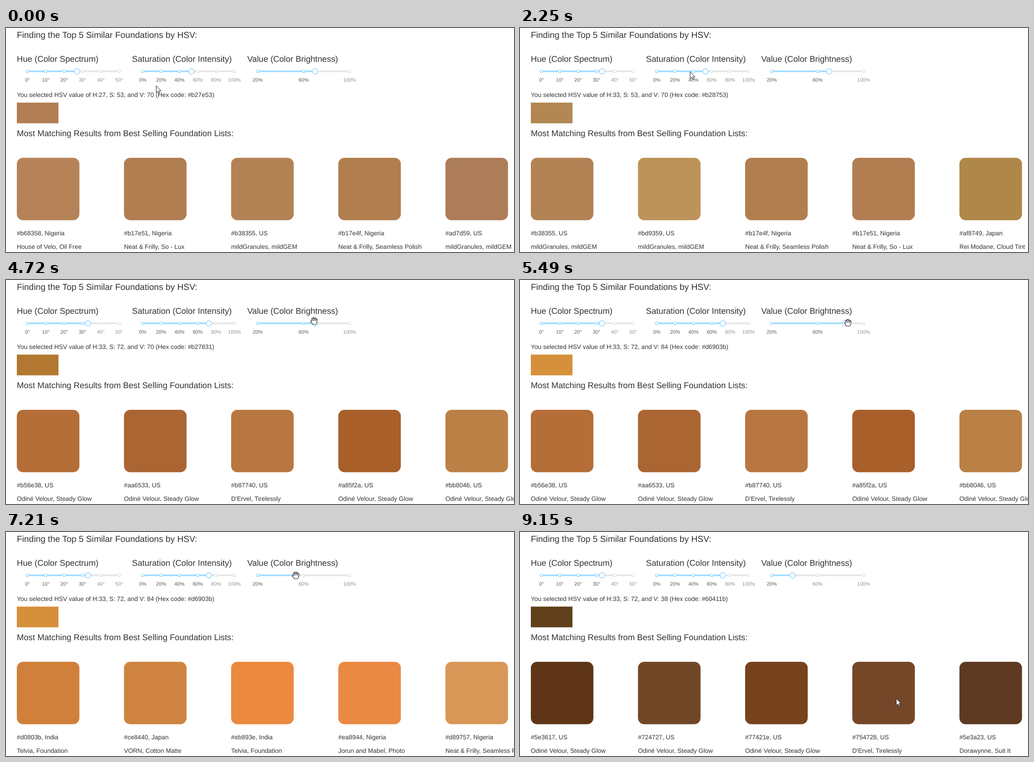
An HTML page with a canvas for the animation above (9.22 s loop, 1126x497 px).

```html
<!DOCTYPE html>
<html lang="en">
<head>
<meta charset="utf-8">
<title>Foundation finder</title>
<style>
  html, body { margin: 0; width: 100%; height: 100%; overflow: hidden; background: #fff; }
  svg, canvas { position: absolute; left: 0; top: 0; width: 1126px; height: 497px; display: block; }
  text { font-family: "Liberation Sans", Arial, sans-serif; fill: #333; text-rendering: geometricPrecision; white-space: pre; }
  .title { font-size: 19.35px; }
  .head { font-size: 18.6px; }
  .body { font-size: 13.9px; }
  .mark { font-size: 11.2px; text-anchor: middle; }
</style>
</head>
<body>
<svg id="words" viewBox="0 0 1126 497"></svg>
<canvas id="stage" width="1126" height="497"></canvas>
<script>
const LOOP = 9220;
const svg = document.getElementById('words');
const ctx = document.getElementById('stage').getContext('2d');

// Moves: start, end, number of steps, then the values reached
const cursorMoves = [
  [80, 80, 1, 333, 125],
  [310, 1000, 10, 158, 94],
  [1170, 1550, 6, 184, 94],
  [1870, 2250, 6, 377, 97],
  [2400, 2560, 3, 409, 93],
  [2790, 3250, 7, 451, 94],
  [3800, 3950, 3, 622, 95],
  [4030, 4030, 1, 660, 97],
  [4180, 4720, 8, 683, 91],
  [4800, 5030, 4, 705, 93],
  [5110, 5490, 6, 727, 95],
  [6680, 7370, 10, 606, 97],
  [7600, 7980, 6, 598, 95]
  , [8920, 9150, 4, 834, 369.5]
];

const sliders = [
  { x: 47.5, min: 0, max: 50, marks: [0, 10, 20, 30, 40, 50], unit: '°',
    from: 27, moves: [[1170, 1550, 6, 33]] },
  { x: 303, min: 0, max: 100, marks: [0, 20, 40, 60, 80, 100], unit: '%',
    from: 53, moves: [[2790, 3250, 7, 72]] },
  { x: 558, min: 20, max: 100, marks: [20, 60, 100], unit: '%',
    from: 70, moves: [[4800, 5030, 4, 77.5], [5110, 5490, 6, 84], [6680, 7370, 10, 41], [7600, 7980, 6, 38]] }
];

// Chosen colour: time of the text, time of the swatch
const picks = [
  { text: 0, fill: 0, hsv: [27, 53, 70], hex: '#b27e53' },
  { text: 1710, fill: 1870, hsv: [33, 53, 70], hex: '#b28753' },
  { text: 3400, fill: 3400, hsv: [33, 72, 70], hex: '#b27831' },
  { text: 5490, fill: 5490, hsv: [33, 72, 84], hex: '#d6903b' },
  { text: 7830, fill: 7830, hsv: [33, 72, 38], hex: '#60411b' }
];

const mild = 'mildGranules, mildGEM';
const neat = 'Neat & Frilly, ';
const odine = 'Odiné Velour, Steady Glow';
const ervel = "D'Ervel, Tirelessly";

const results = [
  { text: 0, fill: 0, cards: [
    ['#b68358', 'Nigeria', 'House of Velo, Oil Free'],
    ['#b17e51', 'Nigeria', neat + 'So - Lux'],
    ['#b38355', 'US', mild],
    ['#b17e4f', 'Nigeria', neat + 'Seamless Polish'],
    ['#ad7d59', 'US', mild]] },
  { text: 2180, fill: 2250, cards: [
    ['#b38355', 'US', mild],
    ['#bd9359', 'US', mild],
    ['#b17e4f', 'Nigeria', neat + 'Seamless Polish'],
    ['#b17e51', 'Nigeria', neat + 'So - Lux'],
    ['#af8749', 'Japan', 'Rei Modane, Cloud Tint']] },
  { text: 3950, fill: 4030, cards: [
    ['#b56e38', 'US', odine],
    ['#aa6533', 'US', odine],
    ['#b87740', 'US', ervel],
    ['#a85f2a', 'US', odine],
    ['#bb8046', 'US', odine]] },
  { text: 6190, fill: 6190, cards: [
    ['#d0803b', 'India', 'Telvia, Foundation'],
    ['#ce8440', 'Japan', 'VORN, Cotton Matte'],
    ['#eb893e', 'India', 'Telvia, Foundation'],
    ['#ea8944', 'Nigeria', 'Jorun and Mabel, Photo'],
    ['#d89757', 'Nigeria', neat + 'Seamless Polish']] },
  { text: 8210, fill: 8290, cards: [
    ['#5e3617', 'US', odine],
    ['#724727', 'US', odine],
    ['#77421e', 'US', odine],
    ['#754728', 'US', ervel],
    ['#5e3a23', 'US', 'Dorawynne, Suit It']] }
];

const cardX = i => 24 + i * 237.5;
const sliderX = (s, v) => s.x + (v - s.min) / (s.max - s.min) * 203.5;
const current = (list, key, t) => list.filter(item => item[key] <= t).pop();

function follow(start, moves, t) {
  let now = start;
  for (const [from, to, steps, ...goal] of moves) {
    if (t < from) break;
    const gap = (to - from) / (steps - 1) || 1;
    const p = Math.min(1, (Math.floor((t - from) / gap + 1e-6) + 1) / steps);
    now = now.map((v, i) => v + (goal[i] - v) * p);
  }
  return now;
}

function addText(cls, x, y, str = '') {
  const el = document.createElementNS('http://www.w3.org/2000/svg', 'text');
  el.setAttribute('class', cls);
  el.setAttribute('x', x);
  el.setAttribute('y', y);
  el.textContent = str;
  return svg.appendChild(el);
}

function setText(el, str) {
  if (el.textContent !== str) el.textContent = str;
}

addText('title', 24, 22.3, 'Finding the Top 5 Similar Foundations by HSV:');
addText('head', 24, 75.2, 'Hue (Color Spectrum)');
addText('head', 279.3, 75.2, 'Saturation (Color Intensity)');
addText('head', 534.8, 75.2, 'Value (Color Brightness)');
addText('head', 24, 239.5, 'Most Matching Results from Best Selling Foundation Lists:');
const pickText = addText('body', 24, 153);
const cardTexts = [0, 1, 2, 3, 4].map(i => [addText('body', cardX(i), 460.3), addText('body', cardX(i), 489.5)]);
for (const s of sliders) {
  s.labels = s.marks.map(m => addText('mark', sliderX(s, m), 119, m + s.unit));
}

function box(x, y, w, h, r, fill) {
  ctx.fillStyle = fill;
  ctx.beginPath();
  ctx.roundRect(x, y, w, h, r);
  ctx.fill();
}

function ring(x, r, line, color) {
  ctx.beginPath();
  ctx.arc(x, 96.2, r, 0, Math.PI * 2);
  ctx.fillStyle = '#fff';
  ctx.fill();
  ctx.lineWidth = line;
  ctx.strokeStyle = color;
  ctx.stroke();
}

function drawSlider(s, value) {
  const x = sliderX(s, value);
  box(s.x, 94.3, 203.5, 3.8, 2, '#e6e6e6');
  box(s.x, 94.3, x - s.x, 3.8, 2, '#a3deff');
  s.marks.forEach((m, i) => {
    const on = m <= value;
    ring(sliderX(s, m), 3.1, 1.4, on ? '#9bdaff' : '#e4e4e4');
    s.labels[i].style.fill = on ? '#595959' : '#919191';
  });
  ring(x, 6, 1.5, '#91d5ff');
}

function polygon(points) {
  ctx.beginPath();
  points.forEach(([x, y]) => ctx.lineTo(x, y));
  ctx.closePath();
}

const arrow = [[0, 0], [0, 15.4], [3.6, 12], [6, 17.4], [8.4, 16.4], [6.1, 11.2], [10.7, 11.2]];
const palm = [[-4.3, 0], [5.5, 0], [5.4, 3], [3.6, 7], [-2, 7], [-4.6, 4]];
const fingers = [
  [-3.2, 1, -4.3, -4.8], [-0.7, 0, -1, -6.2], [2, 0, 2.4, -5.6], [4.5, 1, 5.6, -3.2], [-3, 5, -6.3, 0.8]
];

function drawArrow() {
  polygon(arrow);
  ctx.fillStyle = '#fff';
  ctx.strokeStyle = '#111';
  ctx.lineWidth = 1;
  ctx.fill();
  ctx.stroke();
}

function drawHand() {
  ctx.lineCap = ctx.lineJoin = 'round';
  for (const [color, width, edge] of [['#111', 4, 2.2], ['#fff', 1.8, 0.2]]) {
    ctx.fillStyle = ctx.strokeStyle = color;
    ctx.lineWidth = edge;
    polygon(palm);
    ctx.fill();
    ctx.stroke();
    ctx.lineWidth = width;
    for (const [x1, y1, x2, y2] of fingers) {
      ctx.beginPath();
      ctx.moveTo(x1, y1);
      ctx.lineTo(x2, y2);
      ctx.stroke();
    }
  }
}

function draw(t) {
  ctx.clearRect(0, 0, 1126, 497);

  const values = sliders.map(s => follow([s.from], s.moves, t)[0]);
  sliders.forEach((s, i) => drawSlider(s, values[i]));

  const pick = current(picks, 'text', t);
  const [h, s, v] = pick.hsv;
  setText(pickText, `You selected HSV value of H:${h}, S: ${s}, and V: ${v} (Hex code: ${pick.hex})`);
  box(24, 165.6, 92.3, 46, 0, current(picks, 'fill', t).hex);

  current(results, 'fill', t).cards.forEach(([hex], i) => box(cardX(i), 288, 138.7, 138.5, 14, hex));
  current(results, 'text', t).cards.forEach(([hex, land, name], i) => {
    setText(cardTexts[i][0], `${hex}, ${land}`);
    setText(cardTexts[i][1], name);
  });

  const [x, y] = follow([333, 128], cursorMoves, t);
  const onHandle = sliders.some((sl, i) => Math.hypot(x - sliderX(sl, values[i]), y - 96.2) < 9);
  ctx.save();
  ctx.translate(x, y);
  if (onHandle) drawHand(); else drawArrow();
  ctx.restore();
}

function tick() {
  draw(performance.now() % LOOP);
  requestAnimationFrame(tick);
}
draw(0);
requestAnimationFrame(tick);
</script>
</body>
</html>
```
